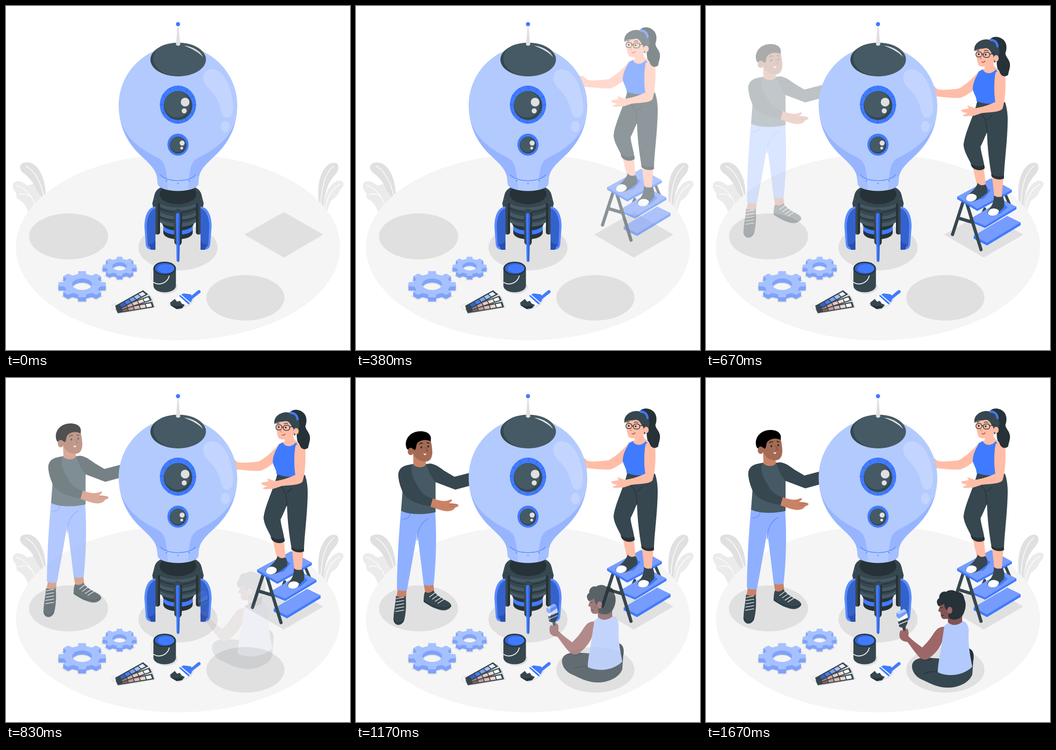
Recreate the animation shown at these times as an HTML page. Size 748 by 748 pixels, loop 1.71 s.

```html
<!DOCTYPE html>
<html lang="en">
<head>
<meta charset="utf-8">
<title>Building an idea</title>
<style>
html, body { margin: 0; width: 100%; height: 100%; overflow: hidden; background: #fff }
svg { display: block; width: 100%; height: 100% }
.blue { fill: #407bff }
.mid { fill: #769cff }
.shade { fill: #97b5ff }
.pale { fill: #b3caff }
.ink { fill: #263238 }
.dark { fill: #37474f }
.slate { fill: #455a64 }
.grey { fill: #e0e0e0 }
.light { fill: #ebebeb }
.white { fill: #fff }
.skinA { fill: #ffbda7 }
.skinB { fill: #ca8267 }
.faceB { fill: #a46a54 }
.skinC { fill: #9e6767 }
.faceC { fill: #825353 }
.line { fill: none; stroke-width: 1.5; stroke-linecap: round }
</style>
</head>
<body>
<svg viewBox="0 0 748 748">
  <g id="plants">
    <path class="light" d="M48 448C42 428 32 423 25 419C20 414 25 408 20 404C15 398 14 392 16 386C20 379 31 380 39 385C45 390 47 391 53 389C61 385 67 387 68 395C70 402 78 404 83 412L70 446Z"/>
    <path class="grey" d="M86 414C87 390 80 365 67 350C56 338 40 338 33 344C28 350 31 358 39 364C51 373 60 384 66 400L80 420Z"/>
    <path class="light" d="M690 440C692 412 700 395 712 385C722 378 732 378 734 386C734 394 726 398 724 405C720 414 716 416 706 424L698 446Z"/>
    <path class="grey" d="M681 434C676 398 680 370 694 352C702 341 714 338 720 343C726 350 722 360 714 369C700 385 694 402 690 436Z"/>
    <path class="line" stroke="#fff" d="M43 348C62 356 76 385 82 412M22 390C40 394 55 410 62 430M28 410C40 407 47 409 55 416M713 348C696 360 686 390 685 428M726 388C708 398 698 415 695 440"/>
  </g>
  <ellipse cx="374" cy="524.5" rx="352.5" ry="202.5" fill="#f5f5f5"/>
  <g class="grey">
    <ellipse cx="136" cy="501" rx="86" ry="50"/>
    <ellipse cx="374" cy="525" rx="86" ry="50"/>
    <ellipse cx="520.5" cy="634.5" rx="85" ry="49.5"/>
    <path d="M518 497L604 448L690 497L604 547Z"/>
    <ellipse cx="348" cy="611" rx="25" ry="15"/>
    <path d="M354 648L368 636L404 628L409 637L402 649L376 662Z"/>
    <path d="M238 660L306 622L318 634L325 656L244 670Z"/>
  </g>
  <g id="gears"></g>

  <g id="bucket">
    <path class="line" stroke="#e0e0e0" d="M321 570C313 580 314 596 322 601"/>
    <path class="dark" d="M320.500 571V609C323 627 367 627 369.500 609V571Z"/>
    <ellipse class="ink" cx="345" cy="570.500" rx="24.500" ry="14.500"/>
    <ellipse cx="345" cy="570.500" rx="21.500" ry="12" fill="#3363cc"/>
    <ellipse class="blue" cx="348" cy="571" rx="18" ry="9.500"/>
    <path class="line" stroke="#f0f0f0" style="stroke-width:2" d="M321 601C334 609 351 602 355 587"/>
  </g>

  <g id="swatches">
    <circle class="line" cx="236" cy="654" r="6" stroke="#e0e0e0"/>
  </g>

  <g id="brush">
    <path class="white" d="M366 638L378 629L399 648L384 655Z"/>
    <path class="blue" d="M401 632L418 618Q424 617 423 623L405 637Z"/>
    <path class="blue" d="M376 630L386 625L402 627L406 634L403 642L397 649L390 643Z"/>
    <path class="dark" d="M357 645L367 637L372 643L378 641L382 647L389 650L383 657L371 659L358 651Z"/>
    <path class="ink" d="M358 651L371 653L383 651V657L371 659Z"/>
    <path class="line" stroke="#fff" d="M380 628L400 645" style="stroke-width:2"/>
  </g>

  <g id="man">
    <path class="skinB" d="M91 456L88 474H109L110 456ZM147 444L151 466L170 461L168 443Z"/>
    <path class="dark" d="M87 471C94 475 104 474 108 471C110 490 108 515 104 526C98 537 86 537 82 526C80 514 86 490 87 471Z"/>
    <path class="dark" d="M150 462C156 466 163 464 168 459C172 466 180 472 190 478C202 484 208 488 207 494C200 504 188 504 178 500C164 496 154 488 147 484C147 474 148 466 150 462Z"/>
    <path class="line" stroke="#263238" d="M82 522C86 533 99 533 104 522M148 482C165 494 190 504 206 493"/>
    <path class="line" stroke="#e8e8e8" d="M88 477L104 474M87 484L104 481M87 491L104 488M86 498L104 495M86 505L104 502M160 473L172 464M166 478L179 469M172 483L186 474M178 487L192 478"/>
    <path fill="#8fb0ff" d="M98 283C94 330 90 380 89 456C95 461 108 461 111 458C118 420 128 365 133 335C138 370 143 410 147 446C155 451 166 449 169 445C174 400 176 340 172 287Z"/>
    <path class="line" stroke="#6690f5" d="M101 304C112 305 117 298 118 291M133 350C133 324 145 310 157 303"/>
    <path class="dark" d="M158 183C174 184 182 192 192 199L214 212L260 200V228L216 240L171 223Z"/>
    <path class="slate" d="M125 184C110 187 95 188 92 206C92 220 98 232 101 245L98 286C115 295 150 295 173 289V222L172 190L152 184Z"/>
    <path class="dark" d="M152 184C158 200 164 214 173 224L182 200L166 184Z"/>
    <path class="dark" d="M122 186C105 186 92 192 92 210C93 225 98 238 104 250C112 263 140 274 162 276L167 259C150 254 141 246 136 235C124 215 118 205 122 186Z"/>
    <path class="skinB" d="M162 277L167 259C178 263 188 266 198 264L208 261C210 264 206 267 202 269C212 270 223 271 223 274C222 278 218 278 215 279C214 284 206 287 198 287C185 286 172 280 162 277Z"/>
    <path class="line" stroke="#a9654e" style="stroke-width:1" d="M203 276L216 278M203 272L219 273"/>
    <path class="skinB" d="M124 162L125 186C132 193 146 193 152 186L151 172Z"/>
    <path class="faceB" d="M124 140C120 160 128 178 150 179C161 179 165 172 166 160C166 150 164 138 161 128L132 124Z"/>
    <path d="M109 147C105 128 120 113 140 113C157 113 166 122 162 135C154 130 143 131 135 137C130 141 132 150 128 154C124 151 116 148 114 153C111 153 110 150 109 147Z"/>
    <ellipse class="faceB" cx="119" cy="157" rx="6.500" ry="8"/>
    <ellipse class="ink" cx="142" cy="148" rx="2" ry="2.500"/>
    <ellipse class="ink" cx="157" cy="146" rx="2" ry="2.500"/>
    <path class="line" stroke="#111" d="M138 141Q141 138 145 139M154 138L159 139"/>
    <path class="line" stroke="#8a4c3c" d="M151 148L156 155L152 157"/>
    <path class="white" d="M146 161Q150 163 153 161Q152 165 149 165Z"/>
  </g>

  <g id="woman">
    <path class="line" stroke="#37474f" style="stroke-width:6" d="M648 402L660 430M606 440L598 458"/>
    <path class="blue" d="M582 499L655 456L684 470V476L611 520L582 505Z"/>
    <path class="mid" d="M582 499L655 456L684 470L611 514Z"/>
    <path class="blue" d="M573 463L645 421L675 436V441L607 482L573 468Z"/>
    <path class="mid" d="M573 463L645 421L675 436L607 477Z"/>
    <path class="line" stroke="#37474f" style="stroke-width:7" d="M559 425L536 496M567 428L598 529M548 460L578 469"/>
    <path class="blue" d="M546 414L620 374L665 399V404L590 445L546 419Z"/>
    <path class="mid" d="M546 414L620 374L665 399L590 440Z"/>
    <path class="blue" d="M582 423L608 394L619 400L604 418ZM628 453L648 429L656 437L640 451Z"/>

    <path class="skinA" d="M580 350L590 392L608 388L604 350ZM622 370L627 414L643 414L647 370Z"/>
    <path class="dark" d="M591 384C595 390 603 390 607 387C612 392 613 400 611 406C603 412 592 422 580 424C570 425 563 421 565 415C570 408 584 402 591 384ZM626 411C632 416 640 416 645 413C649 420 650 430 647 438C641 442 636 452 626 455C616 456 610 451 613 445C617 438 626 432 626 411Z"/>
    <path class="white" d="M566 415C570 406 582 405 588 412C590 418 586 422 578 424C570 425 563 421 566 415ZM614 446C618 437 632 438 637 444C637 450 632 454 626 455C617 456 611 452 614 446Z"/>
    <path class="skinA" d="M594 140C578 160 562 172 549 179C530 181 514 183 503 180L494 172L482 171L478 186L492 195C510 196 530 200 553 199C570 193 584 180 594 172Z"/>
    <path class="dark" d="M590 205C584 235 562 275 560 302C562 320 574 335 578 347C586 358 600 358 606 352C604 335 598 318 597 305C602 295 606 285 611 274C612 310 616 340 621 368C628 377 642 378 648 373C648 345 656 290 656 245C656 230 653 215 650 208Z"/>
    <path class="ink" d="M575 342C584 349 597 349 605 345L606 352C600 358 586 358 578 349ZM620 365C628 371 640 371 648 368V374C642 378 628 377 621 370Z"/>
    <path class="line" stroke="#263238" d="M597 233C605 239 610 247 611 275M611 247L622 237"/>
    <path class="skinA" d="M605 118L606 135L600 138C606 149 624 149 632 140L636 136C626 134 624 128 625 114Z"/>
    <path class="blue" d="M594 141L602 137C606 148 622 148 629 138L638 142C631 160 626 178 628 196L630 211C614 213 600 211 588 206C589 198 582 190 580 180C580 165 588 152 594 141Z"/>
    <path class="skinA" d="M630 143C640 136 650 142 651 155C652 180 650 205 645 222C640 230 620 230 600 232L582 238C572 238 562 241 558 237L568 232C560 231 555 229 555 225L571 222L568 216C576 217 582 222 588 221C605 218 618 213 629 208C626 185 626 160 630 143Z"/>
    <path class="ink" d="M616 76C618 66 632 63 643 70C655 77 655 92 651 102C652 112 662 116 661 130C660 138 658 142 657 149C648 156 640 150 638 141C630 134 634 120 630 108Z"/>
    <path class="skinA" d="M588 94C587 106 589 120 593 128C600 134 610 130 618 125L626 119L630 92L600 84Z"/>
    <path class="dark" d="M584 98C581 84 592 74 606 72C622 70 636 82 638 96C638 108 634 121 626 122C626 115 627 108 621 102C618 96 614 90 608 91C600 93 590 91 584 98Z"/>
    <ellipse class="skinA" cx="631" cy="113" rx="5.500" ry="7"/>
    <path class="line" stroke="#407bff" style="stroke-width:5" d="M619 73C628 73 633 79 634 87"/>
    <g class="line" stroke="#263238">
      <rect x="587" y="99" width="13" height="11" rx="5"/>
      <rect x="603" y="100" width="14" height="11" rx="5"/>
      <path d="M600 104H603M617 104L628 102M589 96L594 95M605 97Q609 94 613 97"/>
    </g>
    <circle class="ink" cx="593" cy="104" r="2"/>
    <circle class="ink" cx="608" cy="105" r="2"/>
    <path class="line" stroke="#e58b7b" d="M600 107L596 114L600 115"/>
    <path class="line" stroke="#a63f3f" d="M600 121Q604 123 607 119"/>
  </g>

  <g id="rocket">
    <path class="ink" d="M342 476V493C344 512 404 512 406 493V476Z"/>
    <path class="blue" d="M342 478V486C346 501 402 501 406 486V478Z"/>
    <path class="ink" d="M335 460L341 477C350 492 398 492 407 477L413 460Z"/>
    <path class="dark" d="M323 410L318 430L332 466C345 486 403 486 416 466L430 430L425 410Z"/>
    <path class="slate" d="M328 440C340 463 408 463 420 440V450C406 469 342 469 328 450ZM331 459C345 477 403 477 417 459V466C403 485 345 485 331 466Z"/>
    <path class="line" stroke="#263238" style="stroke-width:2" d="M322 427C334 456 414 456 426 427M329 453C343 471 405 471 419 453"/>
    <ellipse class="dark" cx="374" cy="412" rx="51" ry="26"/>
    <path class="slate" d="M323 414C326 446 422 446 425 414V421C420 452 328 452 323 421Z"/>
    <ellipse class="ink" cx="374" cy="409" rx="40" ry="22"/>
    <g id="fin">
      <path class="dark" d="M319 436V427Q321 420 328 422L335 430V493Q331 499 325 496V436Z"/>
      <path class="ink" d="M330 430L335 428V493Q333 497 330 497Z"/>
      <path fill="#5b8cff" d="M325 436C309 437 301 456 301 480L304 520C306 528 311 531 325 530Z"/>
      <path fill="#3462cc" d="M325 440C313 443 306 460 306 480L308 520Q312 528 325 526Z"/>
      <path fill="#284fae" d="M311 518Q319 519 325 510V530H315Z"/>
    </g>
    <use href="#fin" transform="matrix(-1 0 0 1 748 0)"/>
    <path class="dark" d="M365 450Q366 441 374 441T383 450L382 515Q374 526 366 515Z"/>
    <path class="ink" d="M376 450H383L382 515Q379 521 376 521Z"/>
    <path class="blue" d="M369.500 457Q369 450 374 450T378.500 457L377 554Q374 559 371 554Z"/>
    <path fill="#3462cc" d="M375 451Q379 452 378.500 457L377 554L374.500 557Z"/>

    <path class="pale" d="M245 216C245 145 303 87 374 87S503 145 503 216C503 264 482 299 457 323C435 344 420 356 419 378L418 388C410 407 338 407 330 388L329 378C328 356 313 344 291 323C266 299 245 264 245 216Z"/>
    <g id="shade">
      <path class="shade" d="M249 250C266 298 304 316 330 330C346 339 347 352 350 373L352 399C340 397 332 393 330 388L329 378C328 356 313 344 291 323C268 301 255 276 249 250Z"/>
      <path fill="#a4bfff" d="M329 368Q338 374 350 377L352 399Q333 396 330 388Z"/>
    </g>
    <use href="#shade" transform="matrix(-1 0 0 1 748 0)"/>
    <path class="line" stroke="#5b8cff" d="M336 367C348 384 400 384 412 367"/>
    <g class="blue"><circle cx="349" cy="380" r="1.300"/><circle cx="374" cy="386" r="1.300"/><circle cx="398" cy="380" r="1.300"/></g>
    <g fill="#c3d5ff">
      <path d="M429 155C429 142 440 136 452 138C474 142 493 178 494 220C494 235 488 243 480 243C470 243 469 228 464 215C458 195 445 185 435 173Q429 165 429 155Z"/>
      <ellipse cx="477" cy="262" rx="9.500" ry="12"/>
    </g>
    <ellipse class="blue" cx="374" cy="214.500" rx="39.500" ry="41.500"/>
    <ellipse cx="374" cy="214.500" rx="35.500" ry="37" fill="none" stroke="#2f5fcf" stroke-width="8" stroke-dasharray="1 18"/>
    <ellipse class="dark" cx="374" cy="216.500" rx="31" ry="31.500"/>
    <ellipse class="slate" cx="372" cy="214" rx="28" ry="28.500"/>
    <circle class="grey" cx="389.500" cy="209" r="9.500"/>
    <circle class="grey" cx="387.500" cy="228" r="5.500"/>
    <ellipse class="blue" cx="374" cy="301.500" rx="23" ry="24"/>
    <ellipse class="dark" cx="374" cy="302.500" rx="18" ry="18.500"/>
    <ellipse class="slate" cx="373" cy="301" rx="16" ry="16.500"/>
    <circle class="grey" cx="383" cy="298" r="5.500"/>
    <circle class="grey" cx="382" cy="309" r="3"/>
    <ellipse class="dark" cx="374" cy="116.500" rx="60" ry="36.500"/>
    <path class="slate" d="M350 83C308 92 308 144 368 152.500A60 36.500 0 1 0 350 83Z"/>
    <path class="grey" d="M387 86C411 89 425 101 428 111C420 101 405 93 387 86Z"/>
    <path class="grey" d="M373.300 43H374.700L379 84Q374 89 369.500 84Z"/>
    <circle class="blue" cx="374" cy="39.500" r="4.500"/>
  </g>

  <g id="painter">
    <path class="dark" d="M569 588C580 589 584 600 581 615L579 645C570 667 540 675 520 673C500 672 482 661 470 656C455 650 447 636 448 625C450 611 465 608 480 608L520 611Z"/>
    <path class="ink" d="M570 588C580 589 584 600 581 615L579 632L572 628Z"/>
    <path class="line" stroke="#263238" d="M474 643C488 637 497 637 506 640M470 612Q479 616 490 611"/>
    <path class="pale" d="M517 541C520 536 526 535 528 530C538 541 550 538 558 528C570 532 572 545 571 556C570 585 575 605 579 628C562 645 530 652 504 640C504 620 510 600 512 580Z"/>
    <path class="dark" d="M417 527L440 519L438 533L434 541L435 556L430 558L427 543L420 541Z"/>
    <path class="white" d="M416 519L437 510L439 521L418 530Z"/>
    <path class="mid" d="M414 518V511L430 502L436 506L437 512L419 524Z"/>
    <path class="pale" d="M414 511L430 502L436 506L420 514Z"/>
    <path class="line" stroke="#fff" d="M419 536L438 528"/>
    <path class="skinC" d="M518 541C505 540 498 550 492 560C484 572 476 580 470 586C460 578 448 570 440 561C441 553 440 546 436 544Q434 554 424 548C420 552 420 560 422 566C426 572 432 573 438 574C446 584 455 598 463 606C470 614 478 614 484 610C498 600 508 588 513 574Z"/>
    <path class="faceC" d="M526 516V531C536 541 550 537 557 530V514Z"/>
    <path class="faceC" d="M510 490C509 498 505 504 505 507L510 509C510 520 513 525 520 524L534 523L547 520L545 488Z"/>
    <path class="ink" d="M507 497C500 491 501 481 507 479C506 469 515 462 522 465C529 459 540 461 544 465C556 464 561 472 562 481C567 492 564 506 558 516C551 526 538 528 528 522C526 516 528 512 526 506C520 503 518 497 518 490C515 494 510 493 507 497Z"/>
    <ellipse class="skinC" cx="530" cy="505" rx="5.500" ry="7.500"/>
    <path class="line" stroke="#263238" d="M510 500L514 499M512 517L517 516"/>
  </g>
</svg>
<script>
const $ = id => document.getElementById(id);
const path = (cls, d, extra = '') => `<path class="${cls}" d="${d}" ${extra}/>`;

// Flat cog with eight teeth, extruded downwards.
function gear(cx, cy, rx, hole, depth) {
  const at = (deg, r) => {
    const a = deg * Math.PI / 180;
    return `${(cx + rx * r * Math.cos(a)).toFixed(1)} ${(cy + rx * .56 * r * Math.sin(a)).toFixed(1)}`;
  };
  let d = '';
  for (let a = 0; a < 360; a += 45)
    d += `${a ? 'L' : 'M'}${at(a - 13, .78)}L${at(a - 9, 1)}L${at(a + 9, 1)}L${at(a + 13, .78)}`;
  d += `ZM${cx - hole} ${cy}a${hole} ${hole * .58} 0 1 0 ${2 * hole} 0a${hole} ${hole * .58} 0 1 0 ${-2 * hole} 0Z`;
  let out = path('grey', d, `fill-rule="evenodd" stroke="#e0e0e0" stroke-width="4" transform="translate(0 ${depth})"`);
  for (let y = depth; y >= 0; y--)
    out += path('', d, `fill-rule="evenodd" fill="${y ? '#7fa2fa' : '#a6c1ff'}" transform="translate(0 ${y})"`);
  return out;
}
$('gears').innerHTML = gear(165.5, 605, 51.5, 21.5, 9) + gear(247, 566, 37.5, 15.5, 8);

// Card from pivot edge (a, b) to far edge (d, c), with five colour chips.
function swatch([a, b, c, d], colors) {
  const mix = (p, q, k) => p.map((v, i) => v + (q[i] - v) * k);
  const point = (u, v) => mix(mix(a, d, u), mix(b, c, u), v).map(n => n.toFixed(1)).join(' ');
  const quad = (u, w, v) => `M${point(u, v)}L${point(w, v)}L${point(w, 1 - v)}L${point(u, 1 - v)}Z`;
  return path('dark', quad(0, 1, 0)) + colors.map((color, i) =>
    path('', quad(.15 + i * .165, .29 + i * .165, .2), `fill="${color}"`)).join('');
}
$('swatches').innerHTML +=
  swatch([[239, 659], [243, 668], [322, 655], [318, 643]], ['#8a6460', '#c19a93', '#dcbab2', '#f0d5cc', '#fff']) +
  swatch([[238, 656], [243, 665], [317, 640], [312, 630]], ['#a87b75', '#cfa79f', '#e8c8be', '#f3ddd6', '#fff']) +
  swatch([[237, 652], [243, 662], [309, 627], [298, 618]], ['#3462cc', '#4a7cf5', '#7c9fff', '#a9c1ff', '#e4ecff']);

// cubic-bezier(.36, -.01, .5, 1.38)
function ease(x) {
  if (x <= 0 || x >= 1) return x <= 0 ? 0 : 1;
  const curve = (s, p, q) => 3 * (1 - s) ** 2 * s * p + 3 * (1 - s) * s * s * q + s ** 3;
  let low = 0, high = 1;
  for (let i = 0; i < 24; i++) {
    const s = (low + high) / 2;
    if (curve(s, .36, .5) < x) low = s; else high = s;
  }
  return curve(low, -.01, 1.38);
}

const LOOP = 1710, FPS = 24, DROP = 45;
const delays = { woman: 0, man: .4, painter: .7 };

function draw() {
  const step = Math.floor((performance.now() % LOOP + 4.9) * FPS / 1000);
  const time = step < 3 ? 0 : (step + .85) / FPS;
  for (const id in delays) {
    const k = ease(time - delays[id]);
    $(id).setAttribute('transform', `translate(0 ${(k - 1) * DROP})`);
    $(id).setAttribute('opacity', Math.min(1, Math.max(0, k)));
  }
  requestAnimationFrame(draw);
}
draw();
</script>
</body>
</html>
```
